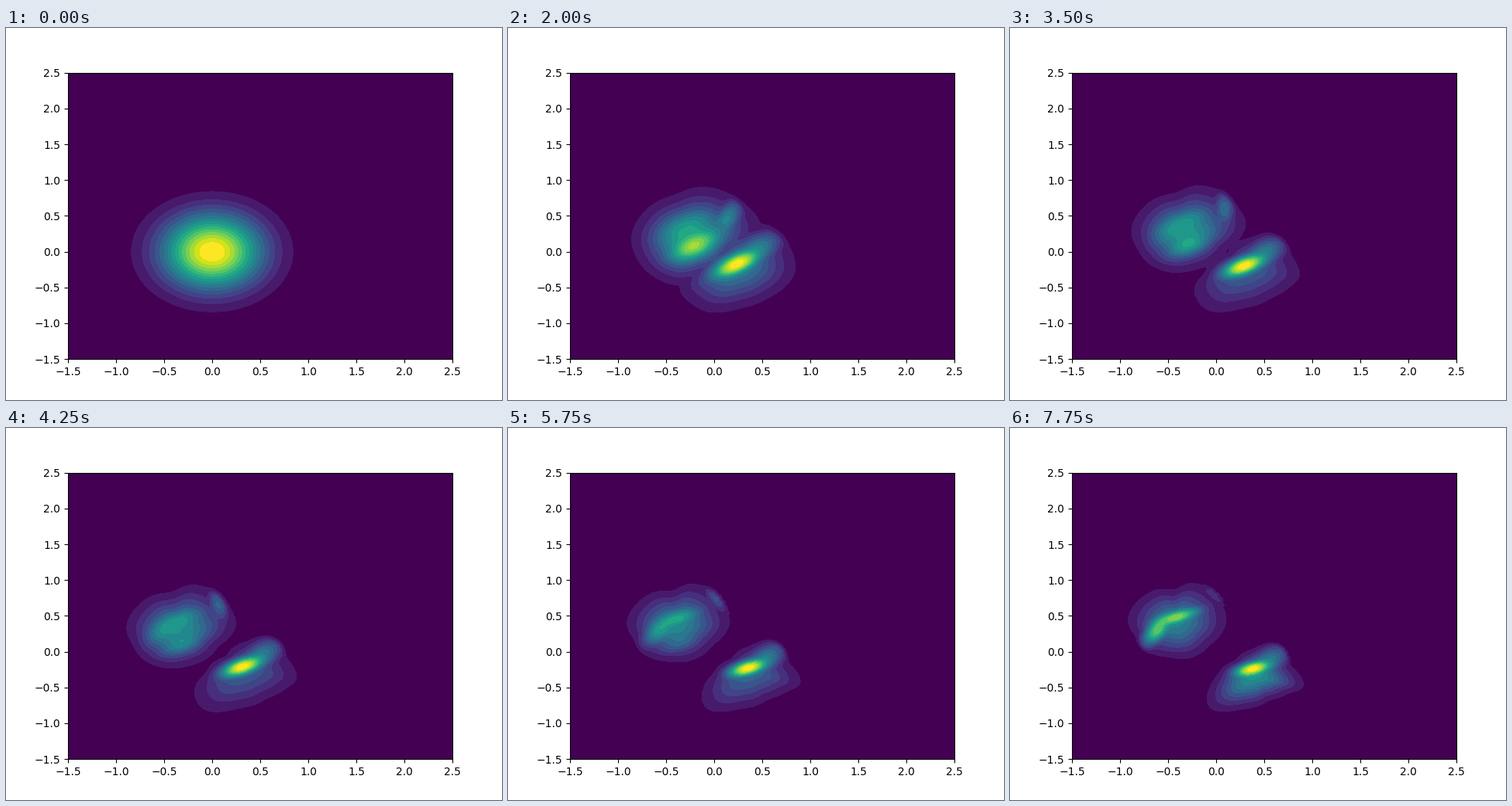
Write a matplotlib script that moves like this. It is 640 by 480 pixels and loops after 8 s.

```python
import numpy as np
import matplotlib.pyplot as plt
from matplotlib.animation import FuncAnimation

FRAMES, INTERVAL = 32, 250
BANDS = 16
SPLIT, END = 1.0, 7.75  # seconds: lobes take shape, last pose

# Edge key points of each lobe: (x, y) at the split, (x, y) at the end
LEFT_EDGE = np.array([
    (-.84, .15, -.92, .43), (-.76, .42, -.80, .72), (-.62, .62, -.62, .87),
    (-.40, .77, -.42, .85), (-.12, .89, -.27, .97), (.10, .86, -.08, .88),
    (.30, .70, .07, .62), (.50, .40, .10, .40), (.20, .05, -.05, .12),
    (-.10, -.30, -.30, -.10), (-.40, -.50, -.50, -.07), (-.63, -.37, -.72, 0),
    (-.80, -.12, -.83, .22)])
RIGHT_EDGE = np.array([
    (.82, -.20, .92, -.50), (.78, .10, .76, -.20), (.65, .30, .66, .08),
    (.50, .40, .56, .12), (.35, .30, .40, .04), (.10, 0, .20, -.13),
    (-.15, -.25, .02, -.33), (-.38, -.53, -.06, -.50), (-.26, -.68, -.10, -.72),
    (-.10, -.84, -.03, -.83), (.30, -.76, .25, -.80), (.60, -.60, .55, -.67),
    (.80, -.36, .76, -.57)])

X, Y = np.meshgrid(np.linspace(-1.5, 2.5, 321), np.linspace(-1.5, 2.5, 321))
ROUND = np.exp(-np.log(BANDS) * (X ** 2 + Y ** 2) / .84 ** 2)


def mix(a, b, s):
    return np.array(a) + s * (np.array(b) - np.array(a))


def edge_radius(points, theta):
    """Radius of a lightly rounded closed edge in each direction."""
    grid = np.linspace(-np.pi, np.pi, 360, endpoint=False)
    r = np.interp(grid, np.arctan2(points[:, 1], points[:, 0]),
                  np.hypot(points[:, 0], points[:, 1]), period=2 * np.pi)
    r = sum(np.roll(r, k) for k in range(-7, 8)) / 15
    return np.interp(theta, grid, r, period=2 * np.pi)


def ridge(height, pose):
    x, y, long, short, deg = pose
    ca, sa = np.cos(np.radians(deg)), np.sin(np.radians(deg))
    u = (X - x) * ca + (Y - y) * sa
    v = (Y - y) * ca - (X - x) * sa
    return height * np.exp(-.5 * ((u / long) ** 2 + (v / short) ** 2))


def lobe(center, edge, height, ridges, s):
    x, y = center
    theta = np.arctan2(Y - y, X - x)
    r = edge_radius(mix(edge[:, :2], edge[:, 2:], s) - center, theta)
    # fine teeth that grow on the upper right side
    r = r * (1 + .015 * s ** 2 * np.exp(-((theta - .6) / .4) ** 2) * np.sin(44 * theta))
    q = np.hypot(X - x, Y - y) / r
    body = height * np.exp(-np.log(height * BANDS) * q ** 2)
    inside = np.clip((1.1 - q) / .15, 0, 1)
    return body ** 4 + sum((inside * z) ** 4 for z in ridges)


def density(t):
    u = max(0, (t - SPLIT) / (END - SPLIT))
    s = 1 - (1 - u) ** 1.6
    rise = u ** 3
    left = lobe(
        mix((-.2, .08), (-.42, .4), s), LEFT_EDGE, .45 + .15 * (1 - u) ** 2,
        [ridge(np.exp(-1.7 * u), mix((-.16, .06, .24, .13, 40), (-.4, .15, .18, .1, 25), s)),
         ridge(.42 + .33 * rise, mix((-.3, .28, .25, .2, 40), (-.61, .31, .17, .08, 62), s)),
         ridge(.42 + .38 * rise, mix((-.2, .35, .25, .17, 40), (-.42, .48, .2, .07, 22), s)),
         ridge(.5 - .27 * s, mix((.18, .38, .2, .1, 48), (0, .8, .15, .05, 130), s))], s)
    right = lobe(
        mix((.2, -.15), (.4, -.33), s), RIGHT_EDGE, .3 + .22 * (2 * u - 1) ** 2,
        [ridge(1, mix((.2, -.15, .23, .1, 40), (.38, -.24, .15, .07, 22), s)),
         ridge(.43, mix((.45, .1, .2, .12, 45), (.54, -.15, .2, .11, 52), s))], s)
    w = np.exp(-t)
    z = w * ROUND + (1 - w) * (left + right) ** .25
    return z / z.max()


fig, ax = plt.subplots(figsize=(6.4, 4.8), dpi=100)
shown = []


def draw(i):
    while shown:
        shown.pop().remove()
    shown.append(ax.contourf(X, Y, density(i * INTERVAL / 1000),
                             levels=np.linspace(0, 1, BANDS + 1), cmap="viridis",
                             vmin=.5 / BANDS, vmax=1 - .5 / BANDS))
    ax.set(xlim=(-1.5, 2.5), ylim=(-1.5, 2.5))
    return []


anim = FuncAnimation(fig, draw, frames=FRAMES, interval=INTERVAL,
                     init_func=lambda: [], repeat=True, repeat_delay=0)
plt.show()
```
